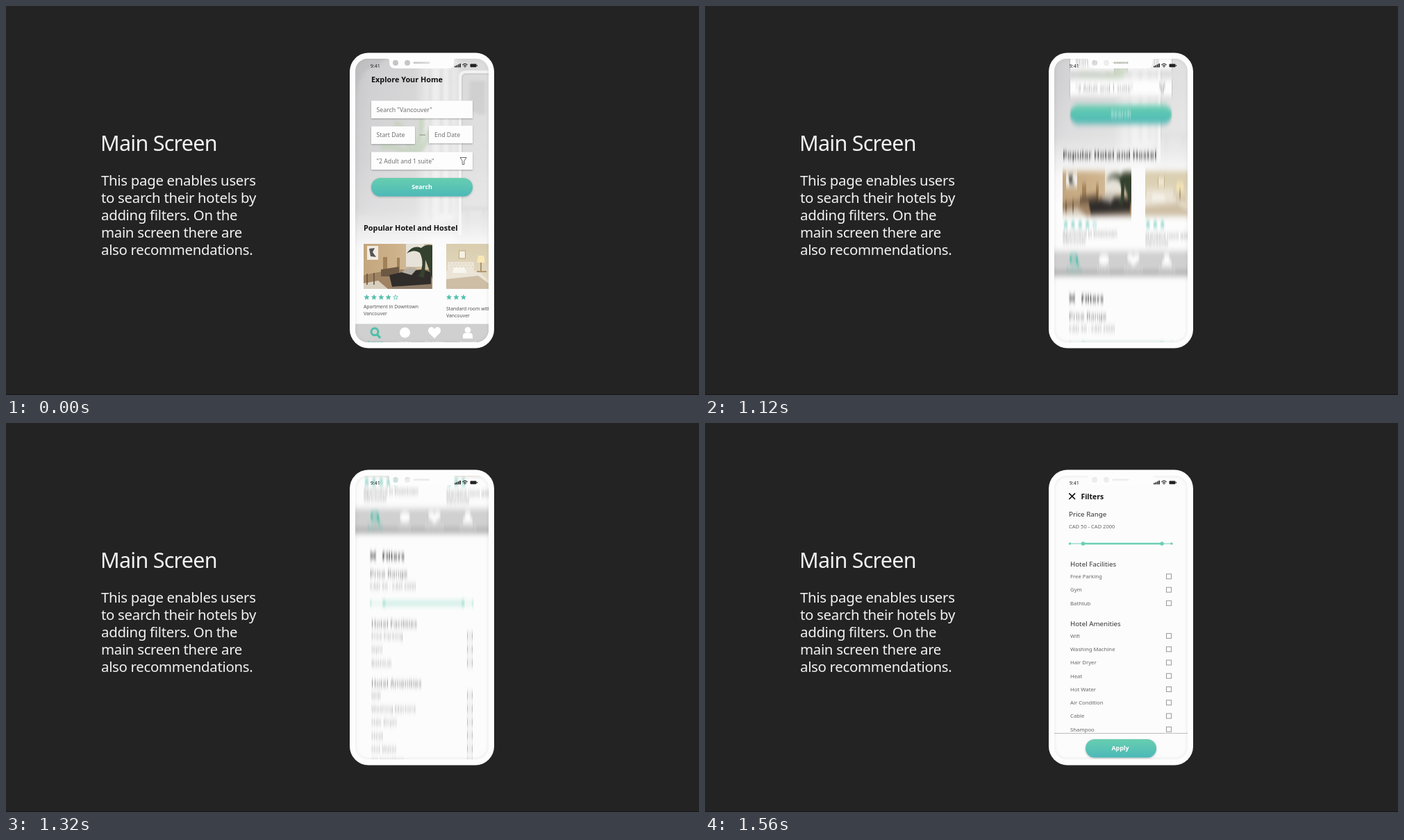
Write an HTML page that moves like this. It is 998x561 px and loops after 3 s.

```html
<!DOCTYPE html>
<html lang="en">
<head>
<meta charset="utf-8">
<title>Main Screen</title>
<style>
  html, body { margin: 0; width: 100%; height: 100%; overflow: hidden; background: #232323; }
  svg { display: block; width: 998px; height: 561px; }
  text { font-family: "Noto Sans", "Open Sans", sans-serif; }
  .title { font-size: 30.5px; letter-spacing: -.75px; fill: #f2f2f2; }
  .body { font-size: 20.4px; letter-spacing: -.3px; fill: #f2f2f2; }
  .head { font-size: 10.85px; font-weight: 700; fill: #111; }
  .field { font-size: 8.7px; fill: #707070; }
  .btn { font-size: 8.8px; font-weight: 700; fill: #fff; text-anchor: middle; }
  .note { font-size: 6.85px; fill: #555; }
  .tab { font-size: 6.5px; fill: #fff; text-anchor: middle; }
  .group { font-size: 9.75px; fill: #333; }
  .row { font-size: 7.75px; fill: #666; }
  .box { fill: #fdfdfd; filter: drop-shadow(0 1px 1.2px rgba(0, 0, 0, .28)); }
  .pill { fill: url(#teal); filter: drop-shadow(0 1.5px 1.5px rgba(0, 0, 0, .25)); }
</style>
</head>
<body>
<svg viewBox="0 0 998 561">
  <defs>
    <linearGradient id="teal" x2="0" y2="1">
      <stop stop-color="#68ceb0"/><stop offset="1" stop-color="#4cb9b8"/>
    </linearGradient>
    <linearGradient id="wall" x2="1" y2="0">
      <stop stop-color="#c4c4c6"/><stop offset=".14" stop-color="#cfcfd1"/>
      <stop offset=".45" stop-color="#d5d5d6"/><stop offset=".56" stop-color="#ededed"/>
      <stop offset=".7" stop-color="#efefef"/><stop offset=".78" stop-color="#dadada"/>
      <stop offset="1" stop-color="#dedede"/>
    </linearGradient>
    <linearGradient id="fade" x2="0" y2="1">
      <stop stop-color="#fbfbfb" stop-opacity="0"/><stop offset=".35" stop-color="#fbfbfb" stop-opacity=".15"/>
      <stop offset=".54" stop-color="#fbfbfb" stop-opacity=".35"/><stop offset=".68" stop-color="#fcfcfc" stop-opacity=".9"/>
      <stop offset=".8" stop-color="#fcfcfc"/>
    </linearGradient>
    <linearGradient id="warm" x2="1" y2="0">
      <stop stop-color="#c3a67e"/><stop offset=".45" stop-color="#cdb18a"/><stop offset="1" stop-color="#d8c8ae"/>
    </linearGradient>
    <linearGradient id="cream" x2="0" y2="1">
      <stop stop-color="#d9cdae"/><stop offset="1" stop-color="#e6dcc8"/>
    </linearGradient>
    <filter id="soft" x="-30%" y="-30%" width="160%" height="160%"><feGaussianBlur stdDeviation="2.2"/></filter>
    <filter id="smear" filterUnits="userSpaceOnUse" x="495" y="56" width="208" height="450" color-interpolation-filters="sRGB">
      <feGaussianBlur id="blur" stdDeviation="0 0"/>
    </filter>
    <clipPath id="screen"><rect x="503" y="76" width="192" height="409" rx="18"/></clipPath>
    <clipPath id="photoA"><rect x="515" y="343" width="99" height="65"/></clipPath>
    <clipPath id="photoB"><rect x="634" y="343" width="99" height="65"/></clipPath>
  </defs>

  <rect width="998" height="561" fill="#232323"/>
  <rect y="560" width="998" height="1" fill="#161616"/>
  <text class="title" x="136" y="208.5">Main Screen</text>
  <g id="copy"></g>

  <rect x="495" y="67.5" width="208" height="426" rx="27" fill="#fdfdfd"/>
  <g clip-path="url(#screen)">
    <rect x="503" y="76" width="192" height="409" fill="#fcfcfc"/>
    <g id="motion">
      <g id="pages">
        <g id="search">
          <rect x="495" y="50" width="208" height="440" fill="url(#wall)"/>
          <g filter="url(#soft)">
            <path d="M503 70H553L535 86Q508 90 503 130Z" fill="#b9b9bc" opacity=".6"/>
            <path d="M611 90V310M627 90V300M640 90V300" stroke="#d6d6d6" stroke-width="3"/>
            <path d="M668 108H690V156H680L666 150Z" fill="#cdcecd"/>
            <path d="M582 215Q580 180 560 168M585 215Q600 190 598 160M578 212Q560 200 540 204M590 214Q606 200 610 180" stroke="#b8cdac" stroke-width="8" fill="none" opacity=".65"/>
            <path d="M656 292H694M664 292V330M688 292V330" stroke="#cdcdcd" stroke-width="4"/>
            <path d="M503 300L600 316L695 300V332H503Z" fill="#d2d2d2" opacity=".5"/>
          </g>
          <path d="M654 330V103Q654 95 662 95H697" fill="none" stroke="#f2f2f2" stroke-width="4"/>
          <path d="M657 300V105Q657 98 664 98H697" fill="none" stroke="#a8a8a8" opacity=".5"/>
          <rect x="495" y="76" width="208" height="400" fill="url(#fade)"/>

          <text class="head" x="526" y="110">Explore Your Home</text>
          <rect class="box" x="526" y="136.5" width="146" height="25.5"/>
          <rect class="box" x="526" y="173.5" width="63" height="25.5"/>
          <rect class="box" x="609" y="172.5" width="63" height="25.5"/>
          <rect class="box" x="526" y="210.5" width="146" height="25.5"/>
          <path d="M595.5 186H604" stroke="#888"/>
          <text class="field" x="533.5" y="152.5">Search "Vancouver"</text>
          <text class="field" x="533.5" y="189">Start Date</text>
          <text class="field" x="617" y="189">End Date</text>
          <text class="field" x="533.5" y="226.5">"2 Adult and 1 suite"</text>
          <path d="M654 218.5H663L659.8 223.5V228.5H657.2V223.5Z" fill="none" stroke="#666"/>
          <rect class="pill" x="526" y="248" width="146" height="26.5" rx="13.2"/>
          <text class="btn" x="599" y="264.3">Search</text>
          <text class="head" x="515" y="324">Popular Hotel and Hostel</text>

          <g clip-path="url(#photoA)">
            <rect x="515" y="343" width="99" height="65" fill="url(#warm)"/>
            <path d="M576 343H602V376H576Z" fill="#e6e2d8"/>
            <path d="M515 388L556 380H614V408H515Z" fill="#a08363"/>
            <rect x="520" y="346" width="16" height="20" fill="#f0ece4"/>
            <path d="M523 350L531 349L528 355L533 362L525 361Z" fill="#555"/>
            <path d="M543 362H549V380H543ZM563 363H567V383H563Z" fill="#a18258"/>
            <path d="M540 380L566 376V390H540Z" fill="#6d5843"/>
            <path d="M552 388L570 384L600 380L612 384V402L556 405Z" fill="#2f2c2a"/>
            <path d="M570 384Q579 373 592 379L584 388Z" fill="#b4aea4"/>
            <path d="M594 390Q604 372 596 356Q588 350 577 357Q586 344 598 349Q604 343 614 345V394Q608 376 604 366Q604 380 602 392Z" fill="#35412f"/>
            <path d="M515 400L536 396L550 408H515Z" fill="#d8cfc0"/>
            <path d="M520 386V402M530 385V402" stroke="#6c543d" stroke-width="1.6"/>
            <path d="M556 405L612 401V408H556Z" fill="#8f7c68"/>
          </g>
          <g clip-path="url(#photoB)">
            <rect x="634" y="343" width="99" height="65" fill="url(#cream)"/>
            <rect x="652.5" y="353" width="9" height="11" fill="#f5f0e2" stroke="#bfa877"/>
            <rect x="636" y="369" width="38" height="13" rx="2" fill="#ece5d6"/>
            <path d="M639 372H673M641 376H673" stroke="#c2b79f" stroke-dasharray="1 4"/>
            <path d="M634 382Q655 374 682 384L695 396V408H634Z" fill="#ebe4d7"/>
            <path d="M634 394L680 389L695 400V408H634Z" fill="#cdbea5"/>
            <path d="M645 377H660L664 385H643Z" fill="#f8f5ee"/>
            <path d="M680 360H688L690 370H678Z" fill="#f7e8b4"/>
            <path d="M684 370V382M678 383H692" stroke="#a1845a" stroke-width="1.6"/>
          </g>
          <g id="stars" stroke="#55bfae" stroke-width=".8"></g>
          <text class="note" x="515" y="436">Apartment in Downtown</text>
          <text class="note" x="515" y="445.5">Vancouver</text>
          <text class="note" x="634" y="438.8">Standard room with</text>
          <text class="note" x="634" y="448.6">Vancouver</text>

          <rect x="495" y="458.5" width="208" height="30" fill="#d0d0d0"/>
          <rect x="495" y="487" width="208" height="7" fill="#a9a9a9"/>
          <circle cx="531" cy="469.8" r="5" fill="none" stroke="#4fbfa9" stroke-width="3"/>
          <path d="M534.5 473.5L539 478.8" stroke="#4fbfa9" stroke-width="3.4"/>
          <g fill="#fff">
            <circle cx="574.5" cy="471" r="7.5"/>
            <path d="M617 479.5L609.5 472C606 467.5 609 463 612.5 463Q615.5 463 617 466Q618.5 463 621.5 463C625 463 628 467.5 624.5 472Z"/>
            <circle cx="665" cy="467.3" r="4.3"/>
            <path d="M658 479.5V476Q658 471.5 662 471.5H668Q672 471.5 672 476V479.5Z"/>
          </g>
          <text class="tab" x="532" y="488" style="fill:#4fbfa9">Explore</text>
          <text class="tab" x="574" y="488">Home</text>
          <text class="tab" x="617" y="488">Favorites</text>
          <text class="tab" x="665" y="488">Account</text>
        </g>

        <g id="filters" transform="translate(0 421)">
          <rect x="495" y="73" width="208" height="450" fill="#fcfcfc"/>
          <path d="M524.3 101.3L533 110M533 101.3L524.3 110" stroke="#111" stroke-width="1.7"/>
          <text class="head" x="541.5" y="109.5" style="font-size:10.4px">Filters</text>
          <text class="group" x="524" y="135">Price Range</text>
          <text class="row" x="524" y="152" style="font-size:7.55px">CAD 50 - CAD 2000</text>
          <g stroke="#6ccfb4" fill="#6ccfb4">
            <path d="M525.5 174H672"/>
            <path d="M544 174H658" stroke-width="2.5"/>
            <g stroke="none">
              <circle cx="525.5" cy="174" r="1.7"/><circle cx="672" cy="174" r="1.7"/>
              <circle cx="544.5" cy="174" r="2.8"/><circle cx="658" cy="174" r="2.8"/>
            </g>
          </g>
          <text class="group" x="526" y="207">Hotel Facilities</text>
          <text class="group" x="526" y="293">Hotel Amenities</text>
          <g id="rows"></g>
          <path d="M495 447.5H703" stroke="#bcbcbc"/>
          <rect class="pill" x="548" y="456" width="102" height="26.5" rx="13.2"/>
          <text class="btn" x="598" y="472">Apply</text>
        </g>
      </g>
    </g>
    <use id="ghost" href="#pages" opacity="0"/>
    <rect x="502" y="75" width="194" height="411" rx="19" fill="none" stroke="#888" stroke-width="3" opacity=".18" filter="url(#soft)"/>
  </g>

  <path fill="#fdfdfd" fill-rule="evenodd" d="M549 75V76Q552 76 552 79V81Q552 90 561 90H636Q645 90 645 81V79Q645 76 648 76V75Z
    M557 82a4 4 0 0 0 8 0a4 4 0 0 0 -8 0Z M574 82a4 4 0 0 0 8 0a4 4 0 0 0 -8 0Z
    M588 80.5H609a1.4 1.4 0 0 1 0 2.8H588a1.4 1.4 0 0 1 0 -2.8Z"/>
  <g opacity=".06">
    <circle cx="561" cy="82" r="4"/><circle cx="578" cy="82" r="4"/>
    <rect x="586.6" y="80.5" width="23.8" height="2.8" rx="1.4"/>
  </g>
  <text x="524.7" y="89" font-size="7.1" fill="#222">9:41</text>
  <g fill="#222">
    <path d="M646 86.5h1.7v2h-1.7zM648.4 85.5h1.7v3h-1.7zM650.8 84.3h1.7v4.2h-1.7zM653.2 83h1.7v5.5h-1.7z"/>
    <path d="M657.5 85Q661 81.8 664.5 85M659 86.8Q661 85 663 86.8" fill="none" stroke="#222" stroke-width="1.1"/>
    <circle cx="661" cy="88" r=".8"/>
    <rect x="668.5" y="83.6" width="9" height="4.6" rx="1"/><rect x="678" y="85" width="1" height="1.8"/>
  </g>
</svg>

<script>
const $ = id => document.getElementById(id);

$('copy').innerHTML = [
  'This page enables users', 'to search their hotels by', 'adding filters. On the',
  'main screen there are', 'also recommendations.'
].map((line, i) => `<text class="body" x="137" y="${259 + i * 25}">${line}</text>`).join('');

const star = (x, filled) => {
  const points = Array.from({ length: 10 }, (_, i) => {
    const r = i % 2 ? 1.5 : 3.6, a = i * Math.PI / 5;
    return `${(x + r * Math.sin(a)).toFixed(2)},${(420.2 - r * Math.cos(a)).toFixed(2)}`;
  });
  return `<polygon points="${points.join(' ')}" fill="${filled ? '#55bfae' : 'none'}"/>`;
};
$('stars').innerHTML =
  [0, 1, 2, 3, 4].map(i => star(519.5 + i * 10.4, i < 4)).join('') +
  [0, 1, 2].map(i => star(638 + i * 10.4, true)).join('');

const list = (top, names) => names.map((name, i) => {
  const y = top + i * 19.25;
  return `<text class="row" x="526" y="${y + 2.8}">${name}</text>
    <rect x="664.5" y="${y - 3.5}" width="7" height="7" fill="none" stroke="#999"/>`;
}).join('');
$('rows').innerHTML = list(221.3, ['Free Parking', 'Gym', 'Bathtub']) +
  list(307, ['Wifi', 'Washing Machine', 'Hair Dryer', 'Heat', 'Hot Water', 'Air Condition', 'Cable', 'Shampoo']);

// Scroll distance at every 40 ms step of the slide.
const LOOP = 3000, START = 1000, STEP = 40, END = 421;
const path = [5, 33, 69, 105, 144, 198, 252, 297, 335, 366, 389, 404, 413, 418];
const at = i => i < 0 ? 0 : i < path.length ? path[i] : END;

const pages = $('pages'), motion = $('motion'), blur = $('blur'), ghost = $('ghost');
const begin = performance.now();
let shown;

function draw() {
  const t = (performance.now() - begin) % LOOP;
  const i = Math.min(path.length, Math.max(-1, Math.floor((t - START) / STEP)));
  if (i !== shown) {
    shown = i;
    const y = at(i), moving = i >= 0 && i < path.length;
    const speed = (at(i + 1) - at(i - 1)) / 2;
    pages.setAttribute('transform', `translate(0 ${-y})`);
    blur.setAttribute('stdDeviation', `0 ${Math.min(4, Math.max(.3, speed * .12))}`);
    if (moving) motion.setAttribute('filter', 'url(#smear)');
    else motion.removeAttribute('filter');
    // The first step still holds a sharp trace of the resting page.
    ghost.setAttribute('y', y);
    ghost.setAttribute('opacity', i === 0 ? .55 : 0);
  }
  requestAnimationFrame(draw);
}
draw();
</script>
</body>
</html>
```
